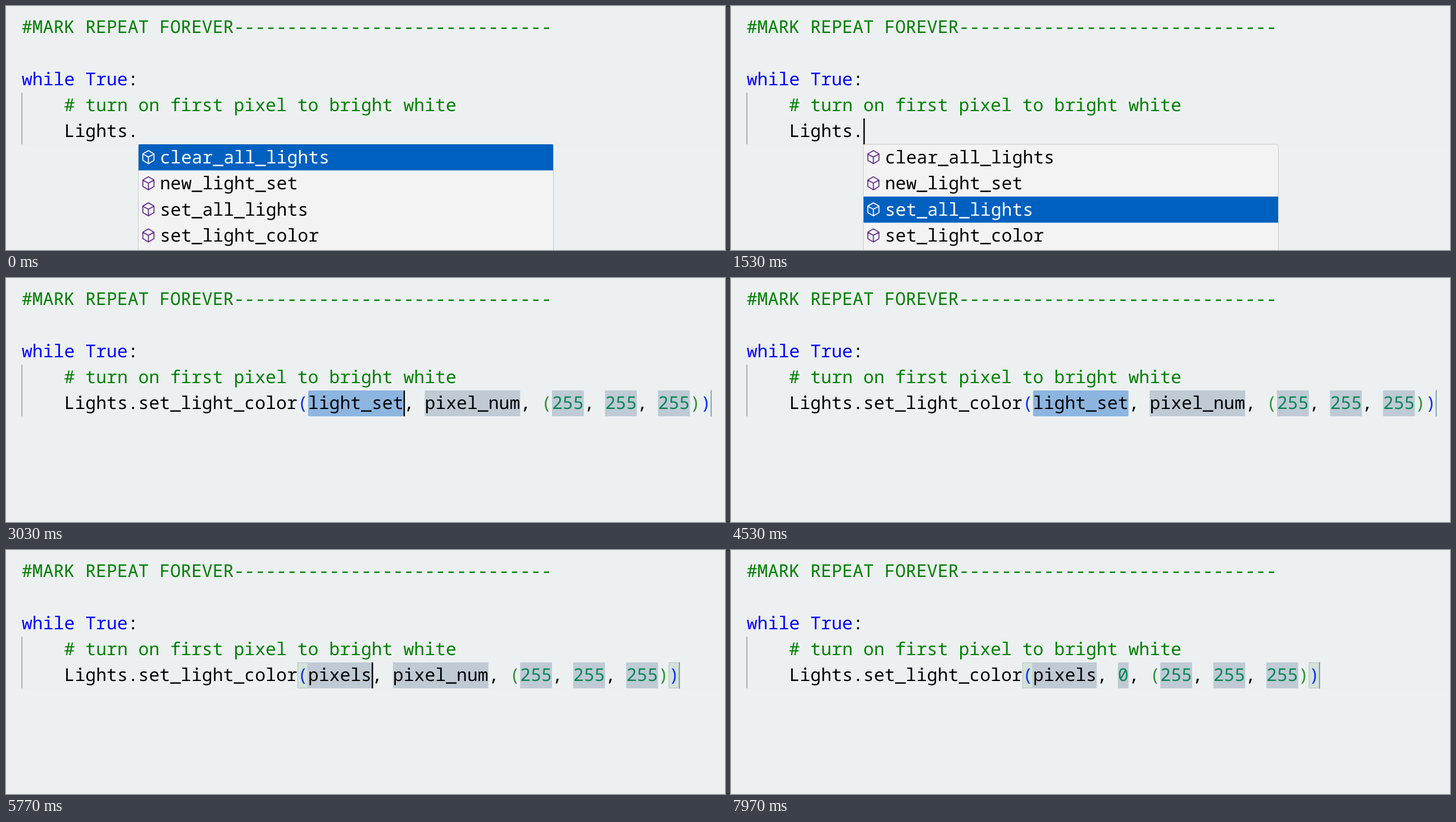
These frames come from a looping animation (1280x434 px, 8000 ms). An HTML page with a canvas:

```html
<!DOCTYPE html>
<html lang="en">
<head>
<meta charset="utf-8">
<title>Code completion</title>
<style>
html, body { margin: 0; width: 100%; height: 100%; overflow: hidden; background: #ecf0f1; }
canvas { display: block; }
</style>
</head>
<body>
<canvas id="stage" width="1280" height="434"></canvas>
<script>
const ctx = document.getElementById('stage').getContext('2d');
const LOOP = 8000, LEFT = 28, TOP = 14.4, CHAR = 18.88, LINE = 46.4, BASE = 33.4;
const GREEN = '#008000', BLUE = '#0000ff', BLACK = '#000', NUMBER = '#098658';
const OUTER = '#0431fa', INNER = '#319331';
const FONT = '31.467px "Noto Sans Mono", monospace';
const METHODS = ['clear_all_lights', 'new_light_set', 'set_all_lights', 'set_light_color'];
const CUBE = new Path2D('M8 1.4 13.5 4.6V11L8 14.3 2.5 11V4.6ZM2.6 4.8 8 7.7 13.4 4.8M8 7.7V14.2');

const SELECT_TIMES = [1170, 1530, 1770];
const TYPE_TIMES = [5100, 5170, 5300, 5530, 5670, 5770];
const BLINKS = [330, 830, 1330, 1830, 2330, 2830, 3030, 3530, 4030, 4530,
                5030, 6300, 6530, 7030, 7470, 7970];
const ACCEPT = 3030, NEXT_ARG = 6530, TYPE_ZERO = 7470;

const passed = (times, t) => times.filter(x => t >= x).length;
const colX = col => LEFT + col * CHAR;
const rowY = row => TOP + row * LINE;

function rect(x, y, w, h, color) {
  ctx.fillStyle = color;
  ctx.fillRect(x, y, w, h);
}

function text(str, x, top, color, weight = 400) {
  ctx.font = `${weight} ${FONT}`;
  ctx.fillStyle = color;
  ctx.fillText(str, x, top + BASE);
}

const code = (str, col, row, color) => text(str, colX(col), rowY(row), color);

function mark(col, length, selected) {
  ctx.fillStyle = selected ? '#8cb5e0' : '#bfcad5';
  ctx.beginPath();
  ctx.roundRect(colX(col), 200, length * CHAR, 46, selected ? 3 : 0);
  ctx.fill();
}

function bracketBox(col) {
  rect(colX(col), 200, CHAR, 46, '#d4e2d9');
  ctx.strokeStyle = '#b9c3bd';
  ctx.lineWidth = 1;
  ctx.strokeRect(colX(col) + 0.5, 200.5, CHAR - 1, 45);
}

// Faint border around the line being edited.
function lineBorder() {
  rect(LEFT, 199, 1252, 2, '#eee');
  rect(LEFT, 245.5, 1252, 2, '#eee');
}

function popup(selected) {
  const top = rowY(5);
  ctx.beginPath();
  ctx.roundRect(235.5, top - 0.3, 739, 220, 4);
  ctx.fillStyle = '#f3f3f3';
  ctx.fill();
  ctx.strokeStyle = '#c8c8c8';
  ctx.lineWidth = 1;
  ctx.stroke();
  METHODS.forEach((name, i) => {
    const y = rowY(5 + i), active = i === selected;
    if (active) rect(236, Math.round(y - 0.2), 738, 46.4, '#0060c0');
    ctx.save();
    ctx.translate(239.1, y + 8.4);
    ctx.scale(1.8, 1.8);
    ctx.lineWidth = 1;
    ctx.lineJoin = 'round';
    ctx.strokeStyle = active ? '#fff' : '#652d90';
    ctx.stroke(CUBE);
    ctx.restore();
    text(name, 274, y, active ? '#fff' : BLACK, active ? 500 : 400);
  });
}

// Draws the completed call and returns the cursor column.
function call(t) {
  const typed = passed(TYPE_TIMES, t);
  const first = typed ? 'pixels'.slice(0, typed) : 'light_set';
  const zero = t >= TYPE_ZERO;
  const second = zero ? '0' : 'pixel_num';
  const brackets = (t >= 5130 && t < 6570) || t >= 7500;
  const firstPicked = !typed, secondPicked = t >= NEXT_ARG && !zero;
  // Each part: text, colour, kind, selected.
  const parts = [
    ['Lights.set_light_color', BLACK],
    ['(', OUTER, 'bracket'],
    [first, BLACK, 'field', firstPicked],
    [', ', BLACK],
    [second, zero ? NUMBER : BLACK, 'field', secondPicked],
    [', ', BLACK],
    ['(', INNER],
    ['255', NUMBER, 'field'], [', ', BLACK],
    ['255', NUMBER, 'field'], [', ', BLACK],
    ['255', NUMBER, 'field'],
    [')', INNER],
    [')', OUTER, 'bracket']
  ];
  if (!firstPicked && !secondPicked) lineBorder();
  let col = 4;
  for (const [str, color, kind, selected] of parts) {
    if (kind === 'field') mark(col, str.length, selected);
    if (kind === 'bracket' && brackets) bracketBox(col);
    code(str, col, 4, color);
    col += str.length;
  }
  rect(colX(col) - 0.6, 199.5, 1.6, 47, '#7189a8');
  const firstEnd = 27 + first.length;
  return t < NEXT_ARG ? firstEnd : firstEnd + 2 + second.length;
}

function draw(t) {
  rect(0, 0, 1280, 434, '#ecf0f1');
  code('#MARK REPEAT FOREVER' + '-'.repeat(30), 0, 0, GREEN);
  code('while True', 0, 2, BLUE);
  code(':', 10, 2, BLACK);
  code('# turn on first pixel to bright white', 4, 3, GREEN);
  let cursor = 11;
  if (t < ACCEPT) {
    lineBorder();
    code('Lights.', 4, 4, BLACK);
    popup(passed(SELECT_TIMES, t));
  } else {
    cursor = call(t);
  }
  rect(27.7, 154, 1.4, 92, '#939393');
  if (passed(BLINKS, t) % 2) rect(colX(cursor), 200, 2.5, 46, BLACK);
}

ctx.textRendering = 'geometricPrecision';
const start = performance.now();
function tick() {
  draw((performance.now() - start) % LOOP);
  requestAnimationFrame(tick);
}
tick();
</script>
</body>
</html>
```
